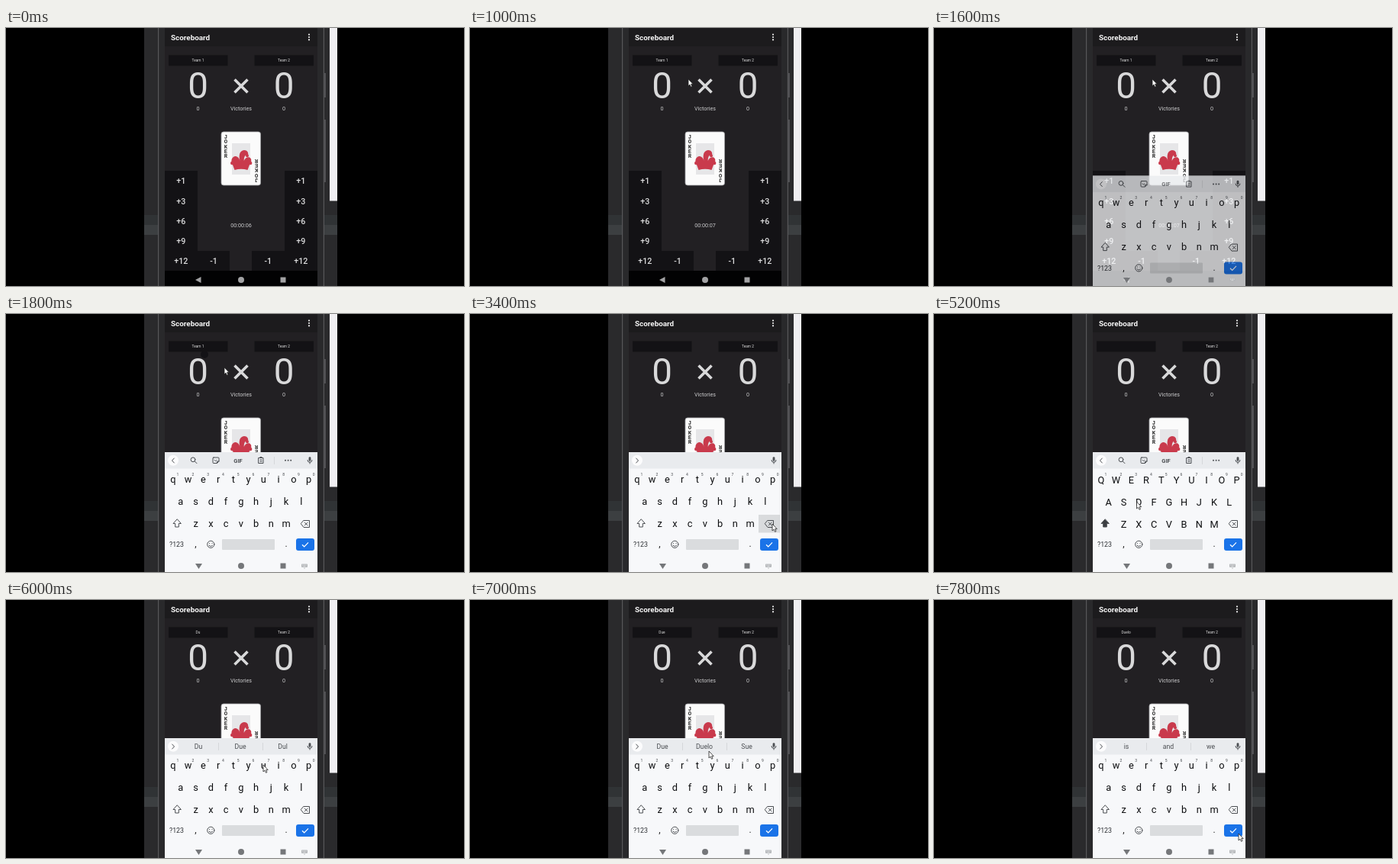
An HTML page for the animation above (8 s loop, 600 px wide and 338 px high).

```html
<!DOCTYPE html>
<html lang="en">
<head>
<meta charset="utf-8">
<title>Scoreboard</title>
<style>
html, body { margin: 0; width: 100%; height: 100%; overflow: hidden; background: #000; }
svg { display: block; width: 100%; height: 100%; }
text { font-family: Roboto, "Open Sans", sans-serif; text-anchor: middle; white-space: pre; }
.card text { font-family: "Liberation Mono", "DejaVu Sans Mono", monospace; font-weight: 700; }
.line { fill: none; stroke: #4b4e52; stroke-width: 1; stroke-linecap: round; stroke-linejoin: round; }
</style>
</head>
<body>
<svg id="stage" viewBox="0 0 600 338"></svg>
<script>
const LOOP = 8000, STEP = 200;
const stage = document.getElementById('stage');

const rect = (x, y, w, h, fill, more = '') =>
  `<rect x="${x}" y="${y}" width="${w}" height="${h}" fill="${fill}" ${more}/>`;
const dot = (x, y, r, fill, more = '') =>
  `<circle cx="${x}" cy="${y}" r="${r}" fill="${fill}" ${more}/>`;
const text = (x, y, size, fill, str, more = '') =>
  `<text x="${x}" y="${y}" font-size="${size}" fill="${fill}" ${more}>${str}</text>`;
const path = (d, more = 'class="line"') => `<path d="${d}" ${more}/>`;
const group = (id, body, more = '') => `<g id="${id}" ${more}>${body}</g>`;

function device() {
  const side = x => rect(x, 0, 18, 338, '#2a2a2c') +
    rect(x, 245, 18, 13, '#303335') + rect(x, 258, 18, 13, '#3c3f41');
  return side(181) + side(416) +
    rect(424, 0, 10, 226.5, '#f0eff2') +
    rect(417, 59, 2, 32, '#505053') + rect(417, 120, 2, 82, '#505053') +
    rect(199, 0, 218, 338, '#57575a') +
    rect(200.2, 0, 215.6, 338, '#29292b') +
    rect(208, 0, 200, 338, '#222023') + rect(208, 0, 200, 24, '#1c1b1d');
}

function card() {
  const word = [...'JOKER'].map((c, i) => text(288, 144.8 + i * 6.4, 7.2, '#2b2b2b', c)).join('');
  const hat = 'M299.500 186L296.500 178C293.500 173 297 167.500 301 168C304 168.500 305.500 171 306.500 174' +
    'C304.500 167 306 160.500 312 160C316 160 318 163 317 167C314 165.500 311.500 168 311.800 174' +
    'C313 170 316.500 168.500 319 169.500C322 171 322 175 319.500 178L316.500 186Q308 183.500 299.500 186Z';
  const red = '#c93a4c';
  return `<g class="card">` +
    rect(282, 136, 51.5, 70, '#fbfbfb', 'rx="3" stroke="#a5a5a7" stroke-width=".8"') +
    rect(296, 151, 24, 41, '#e6e6e8') + word +
    `<g transform="rotate(180 308 171)">${word}</g>` +
    path(hat, `fill="${red}"`) +
    dot(296.2, 177, 2.2, red) + dot(316, 167.3, 2, red) + dot(320.2, 177, 2.2, red) + '</g>';
}

function app() {
  const panel = '#131215', pale = '#d9d9da', soft = '#cacacc';
  const button = (x, y, s) => text(x, y, 10.7, '#dcdcdd', s, 'font-weight="500"');
  let s = text(216, 15.6, 9.9, '#f6f6f6', 'Scoreboard', 'font-weight="600" style="text-anchor:start"');
  for (const y of [8.6, 12, 15.4]) s += dot(397, y, 1.1, '#eee');
  s += rect(213, 35.5, 77.5, 14, panel) + rect(325.5, 35.5, 77.5, 14, panel) +
    text(251.5, 44.3, 4.8, '#ddd', 'Team 1', 'id="team"') + text(364, 44.3, 4.8, '#ddd', 'Team 2');
  for (const x of [251.5, 364])
    s += text(x, 91.5, 47.5, pale, '0') + text(x, 107.8, 7.2, soft, '0');
  s += path('M299.500 67.500L316.500 84.500M316.500 67.500L299.500 84.500', `stroke="${pale}" stroke-width="3.6"`) +
    text(308, 107.8, 7.2, soft, 'Victories') + card() +
    text(308, 261.3, 7.2, soft, '00:00:06', 'id="timer"') +
    rect(208, 187, 43, 131, panel) + rect(365, 187, 43, 131, panel) +
    rect(251, 292, 42, 26, panel) + rect(322, 292, 43, 26, panel);
  ['+1', '+3', '+6', '+9', '+12'].forEach((v, i) => {
    const y = 204.4 + i * 26.2;
    s += button(229.3, y, v) + button(386.3, y, v);
  });
  s += button(272, 309.3, '-1') + button(343.3, 309.3, '-1');
  return s + rect(208, 318, 200, 20, '#020203') +
    path('M248 330L255.500 326V334Z', 'fill="#a2a2a4"') +
    dot(308, 330, 4, '#a2a2a4') + rect(359.5, 326.5, 7, 7, '#a2a2a4');
}

// Letter rows in one case.
function letters(upper) {
  const rows = [['qwertyuiop', 218.8, 220.7], ['asdfghjkl', 228.8, 249.7], ['zxcvbnm', 248.6, 278.6]];
  return rows.map(([keys, x, y]) => [...keys].map((c, i) =>
    text(x + i * 19.75, y + (upper ? 1 : 0), 12.8, '#0d0e10', upper ? c.toUpperCase() : c)).join('')).join('');
}

function tools() {
  return path('M220.300 189L217.500 192L220.300 195') +
    dot(245, 190.8, 2.9, 'none', 'class="line"') + path('M247.300 193L250 195.700') +
    path('M272 188H278Q279 188 279 189V193L276.500 195.500H272Q271 195.500 271 194.500V189Q271 188 272 188ZM276.500 195V193H279M273 191.500Q274.500 194 276 191.500') +
    text(304, 194.5, 7.5, '#4b4e52', 'GIF', 'font-weight="700"') +
    path('M331 188.500H337V195.500H331ZM333 187.500H335M332.800 191H335.200M332.800 193.200H335.200') +
    path('M351.500 187V197', 'stroke="#d0d2d5" stroke-width=".8"') +
    [366, 369.6, 373.2].map(x => dot(x, 191.8, 1, '#4b4e52')).join('');
}

function suggestions() {
  return path('M217.700 189L220.500 192L217.700 195') +
    group('words', path('M278.500 187V197M336.500 187V197', 'stroke="#d0d2d5" stroke-width=".8"') +
      [252, 307, 362.5].map(x => text(x, 195.1, 8.7, '#4b4e52', '', 'class="word"')).join(''));
}

function keyboard() {
  const digits = [...'1234567890'].map((d, i) =>
    text(225 + i * 19.8, 211.6, 5, '#45484c', d)).join('');
  return rect(208, 181, 200, 170, '#f7f8fa') + rect(208, 181, 200, 21.5, '#e9ebee') +
    dot(219, 191.8, 7, '#fcfcfd') + group('tools', tools()) + group('sugg', suggestions()) +
    rect(396.6, 187.2, 2.8, 5.6, '#4b4e52', 'rx="1.4"') +
    path('M395 191.500Q395 194.300 398 194.300Q401 194.300 401 191.500M398 194.500V196') +
    rect(378, 263, 28, 23.5, '#d9dbdd', 'id="eraseHit"') +
    rect(210, 264, 27, 22.5, '#d9dbdd', 'id="shiftHit"') +
    digits + group('lower', letters(false)) + group('upper', letters(true)) +
    path('M224 269L219 274.500H221.700V279H226.300V274.500H229Z', 'id="shift" class="line"') +
    path('M390 270.500H397.500V279.500H390L386.500 275ZM391.200 273L395.200 277M395.200 273L391.200 277') +
    text(223.5, 305.2, 8.8, '#2b2e32', '?123') + text(248.5, 305, 12, '#222', ',') +
    dot(268.3, 301.8, 4.6, 'none', 'class="line"') +
    path('M266 303.300Q268.300 306 270.600 303.300M266.500 300.300V300.500M270.100 300.300V300.500') +
    rect(283, 295, 69, 14, '#dadcde', 'rx="1"') + text(367, 305, 12, '#222', '.') +
    rect(380, 294, 24, 16, '#1a73e8', 'rx="3"') +
    path('M388 302.200L390.700 304.800L396 299.300', 'fill="none" stroke="#fff" stroke-width="1.2"');
}

function navIcons() {
  const ink = '#75777a';
  return path('M248 327H257L252.500 334Z', `fill="${ink}"`) + dot(308, 330, 4, ink) +
    rect(359.5, 326.5, 7, 7, ink) + rect(387, 327.5, 8, 4.2, '#b4b6b9', 'rx=".6"') +
    path('M388 329H394M389.500 330.600H392.500', 'stroke="#f7f8fa" stroke-width=".7" stroke-dasharray="1 .6"') +
    path('M389.800 332.800H392.200L391 334Z', 'fill="#b4b6b9"');
}

stage.innerHTML = device() + app() +
  path('M260 48Q265 49 265 53A5 5 0 0 1 255 53Q255 49 260 48Z', 'id="handle" fill="#131216"') +
  group('keys', keyboard()) + group('nav', navIcons()) +
  group('cursor', path('M0 0V9L2 7.200L3.500 10.300L5 9.600L3.600 6.600H6.200Z',
    'fill="#fff" stroke="#222" stroke-width=".8"')) +
  rect(434, 0, 166, 338, '#000');

const $ = id => document.getElementById(id);
const words = [...document.querySelectorAll('.word')];
const show = (id, on) => $(id).setAttribute('display', on ? 'inline' : 'none');
const within = (t, a, b) => t >= a && t < b;

// Latest entry whose time has come.
const latest = (list, t) => list.reduce((v, e) => t >= e[0] ? e[1] : v, '');

const typed = [[0, 'Team 1'], [2800, 'Team '], [3000, 'Tea'], [3200, 'T'], [3400, ''],
  [5400, 'D'], [6000, 'Du'], [6600, 'Due'], [7600, 'Duelo']];
const hints = [[5400, 'D Do De'], [6000, 'Du Due Dul'], [6600, 'Due Duelo Sue'], [7600, 'is and we']];
const track = [[200, 287, 50], [400, 284, 43], [600, 284, 43], [1000, 286, 67], [1600, 286, 67], [1800, 286, 70],
  [2000, 286, 70], [2600, 392, 272], [3200, 396, 275], [3800, 396, 275], [4400, 225, 272],
  [4600, 225, 272], [5000, 265.5, 246], [5400, 265.5, 246], [5800, 337, 216],
  [6200, 337, 216], [6600, 257, 215], [7000, 313, 198], [7600, 313, 198], [7800, 399, 306]];

function pointer(t) {
  let i = 0;
  while (i < track.length - 2 && t > track[i + 1][0]) i++;
  const [a, x, y] = track[i], [b, u, v] = track[i + 1];
  const k = Math.min(1, Math.max(0, (t - a) / (b - a)));
  return `translate(${x + (u - x) * k} ${y + (v - y) * k})`;
}

function render(time) {
  const t = Math.floor(time % LOOP / STEP) * STEP;
  const open = t >= 1600, rising = t === 1600;
  const upper = within(t, 4600, 5400);
  const icons = t < 2800 || within(t, 3800, 5400);
  const hint = latest(hints, t);

  $('team').textContent = latest(typed, t);
  $('timer').textContent = t < 600 ? '00:00:06' : '00:00:07';
  show('handle', within(t, 1800, 2800));
  show('keys', open);
  show('nav', open);
  $('keys').setAttribute('transform', `translate(0 ${rising ? 12.6 : 0})`);
  $('keys').setAttribute('opacity', rising ? 0.75 : 1);
  show('tools', icons);
  show('sugg', !icons);
  show('words', hint);
  hint.split(' ').forEach((w, i) => words[i].textContent = w);
  show('lower', !upper);
  show('upper', upper);
  $('shift').style.fill = upper ? '#3b3e42' : 'none';
  show('eraseHit', within(t, 2800, 3800));
  show('shiftHit', t === 4600);
  show('cursor', t >= 200);
  $('cursor').setAttribute('transform', pointer(t));
}

const start = performance.now();
(function tick() {
  render(performance.now() - start);
  requestAnimationFrame(tick);
})();
</script>
</body>
</html>
```
